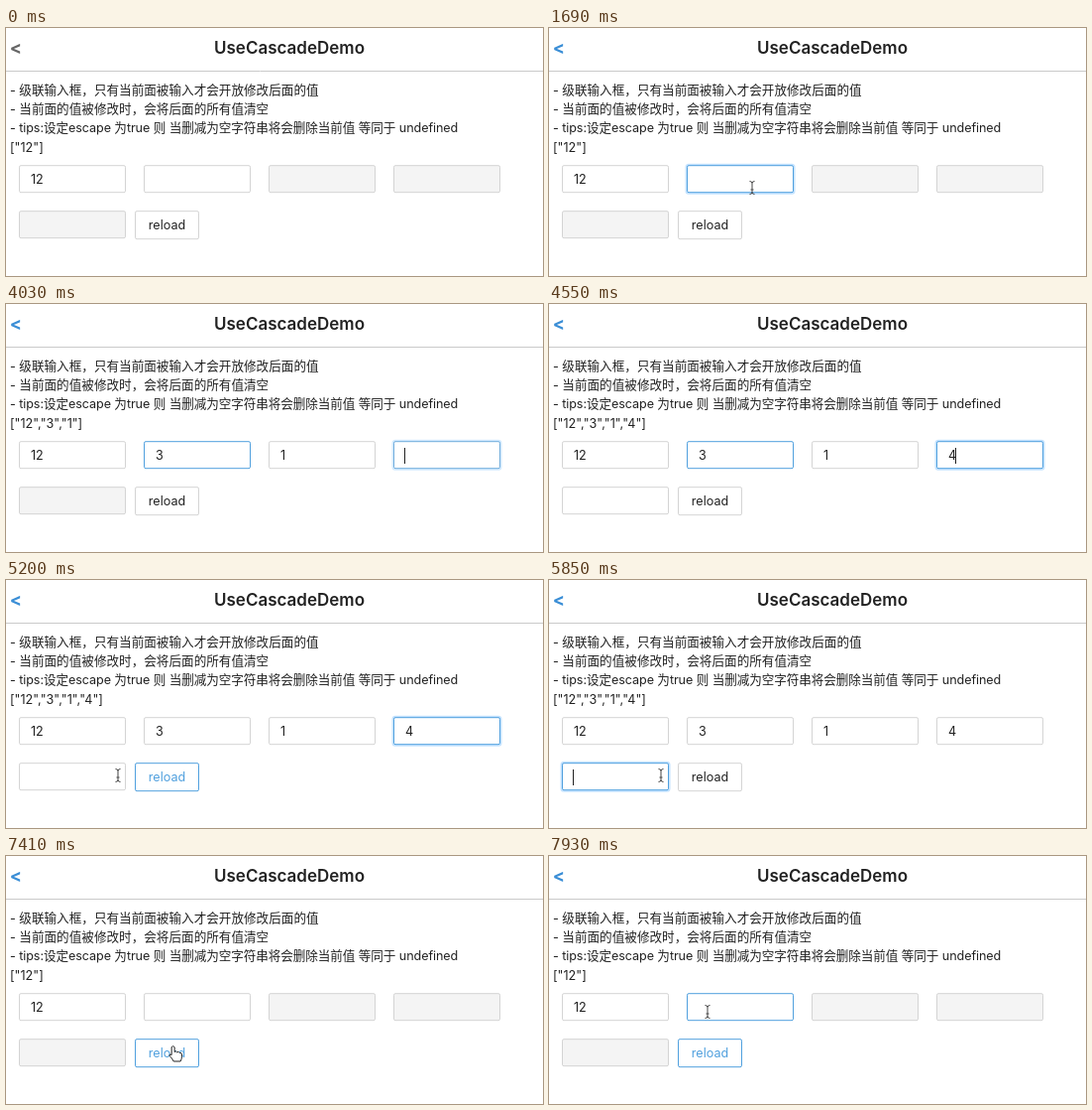
Write an HTML page that moves like this. It is 542 px wide and 250 px high and loops after 8000 ms.

```html
<!DOCTYPE html>
<html lang="zh">
<head>
<meta charset="utf-8">
<style>
  html, body { margin: 0; width: 100%; height: 100%; overflow: hidden; background: #fff; }
  svg { display: block; font: 12.6px Inter, "Noto Sans CJK SC", "Noto Sans CJK", sans-serif; fill: #222; }
  text { white-space: pre; }
</style>
</head>
<body>
<svg id="stage" width="542" height="250" viewBox="0 0 542 250">
  <text id="back" x="3.8" y="26.2" font-size="18" font-weight="700">&lt;</text>
  <text x="286" y="26" font-size="17" font-weight="600" text-anchor="middle">UseCascadeDemo</text>
  <path d="M0 43.5H542" stroke="#cacaca"/>
  <text x="4" y="67">- 级联输入框，只有当前面被输入才会开放修改后面的值</text>
  <text x="4" y="86">- 当前面的值被修改时，会将后面的所有值清空</text>
  <text x="4" y="105" letter-spacing="-.08">- tips:设定escape 为true 则 当删减为空字符串将会删除当前值 等同于 undefined</text>
  <text id="list" x="4" y="124.5"></text>
</svg>
<script>
const LOOP = 8000, STEP = 130, FADE = 260, BLINK = 520, WAKE = 780, RELOAD = 7150;
const GRAY = [212, 212, 212], BLUE = [80, 160, 222], INK = [34, 34, 34];
const stage = document.getElementById('stage');
const list = document.getElementById('list');
const back = document.getElementById('back');

function set(el, attrs) {
  for (const k in attrs) el.setAttribute(k, attrs[k]);
}
function add(tag, attrs) {
  const el = document.createElementNS('http://www.w3.org/2000/svg', tag);
  set(el, attrs);
  return stage.appendChild(el);
}
const mix = (a, b, k) => `rgb(${a.map((v, i) => Math.round(v + (b[i] - v) * k))})`;
const clamp = x => Math.min(1, Math.max(0, x));

// A bordered control; focus is the time it takes the keyboard focus
function control(x, y, w, h, focus) {
  const frame = { x: x + .5, y: y + .7, width: w - 1, height: h - 1, rx: 1.5 };
  return {
    x, y, w, h, focus,
    halo: add('rect', { ...frame, fill: 'none', stroke: '#1890ff', 'stroke-opacity': .25, 'stroke-width': 4 }),
    box: add('rect', { ...frame, fill: '#fff' }),
    text: add('text', { x: x + 12, y: y + 19.4 }),
    has: (px, py) => px > x && px < x + w && py > y && py < y + h
  };
}

// Typed text, time of focus, time of the keystroke
const fields = [['12', -1, 0], ['3', 1170, 2340], ['1', 2730, 3120], ['4', 3900, 4290], ['1', 5460, 6110]]
  .map(([value, focus, typed], i) => ({
    ...control(13 + i % 4 * 126, i < 4 ? 138 : 184, 108, 28, focus), value, typed
  }));
const button = control(130, 184, 65, 29, RELOAD);
set(button.text, { x: 162.5, 'text-anchor': 'middle' });
button.text.textContent = 'reload';
const controls = [...fields, button];

const caret = add('rect', { width: 1, height: 16, fill: '#222' });

// Pointer trips: start, end, destination
const home = [312, 171];
const trips = [
  [780, 1300, 205, 161], [2600, 2730, 205, 161], [4810, 5200, 113, 197],
  [6370, 6760, 171.5, 203], [7280, 7800, 160, 157]
];
const cursors = {
  arrow: { d: 'M0 0V14L3.3 11L5.7 16.6L7.8 15.7L5.5 10.3H10Z', fill: '#111', stroke: '#fff' },
  beam: { d: 'M-2.5-6.5Q0-6.5 0-4.5V4.5Q0 6.5 2.5 6.5M2.5-6.5Q0-6.5 0-4.5M0 4.5Q0 6.5-2.5 6.5M-1.5 2H1.5', fill: 'none', stroke: '#444' },
  hand: { d: 'M-1.5 9V1.2Q0-1 1.5 1.2V6Q3 4.6 4 6.4Q5.6 5 6.6 7Q8.6 6.3 8.8 8.5V11Q8.8 13 7.5 15.5H.5Q-.8 12.5-3.6 9.8Q-3.8 7.6-1.5 9Z', fill: '#fff', stroke: '#222' }
};
const cursor = add('path', { 'stroke-linejoin': 'round' });

const pointAt = t => trips.reduce(([x, y], [from, to, tx, ty]) => {
  const k = clamp((t - from) / (to - from));
  return [x + (tx - x) * k, y + (ty - y) * k];
}, home);

function draw(t) {
  const filled = f => !f.typed || t >= f.typed && t < RELOAD;
  const focused = controls.findLast(c => t >= c.focus);
  const hoverPoint = pointAt(t - STEP);
  const focusLevel = 1 - (1 - clamp((t - focused.focus) / FADE)) ** 2;

  list.textContent = JSON.stringify(fields.filter(filled).map(f => f.value));
  back.setAttribute('fill', t < WAKE ? '#666' : '#3a8ed6');

  controls.forEach((c, i) => {
    const active = c === focused && c.focus > 0;
    const lit = c.has(...hoverPoint) ? 1 : active ? focusLevel : 0;
    c.box.setAttribute('stroke', mix(GRAY, BLUE, lit));
    c.halo.setAttribute('opacity', active && c !== button ? focusLevel : 0);
    if (c === button) return c.text.setAttribute('fill', mix(INK, BLUE, lit));
    c.box.setAttribute('fill', !i || filled(fields[i - 1]) ? '#fff' : '#f4f4f4');
    c.text.textContent = filled(c) ? c.value : '';
  });

  // The blink restarts at each focus and keystroke
  const typing = focused.focus > 0 && focused !== button;
  const since = t - (filled(focused) ? focused.typed : focused.focus);
  set(caret, {
    x: focused.x + (filled(focused) ? 19 : 11), y: focused.y + 7,
    opacity: typing && since % (2 * BLINK) < BLINK ? 1 : 0
  });

  // Typing hides the pointer until it moves again
  const moved = trips.findLast(([from]) => t >= from);
  const key = fields.findLast(f => t >= f.typed).typed;
  const [x, y] = pointAt(t);
  const shape = button.has(x, y) ? 'hand' : fields.some(f => f.has(x, y)) ? 'beam' : 'arrow';
  set(cursor, {
    ...cursors[shape], transform: `translate(${x} ${y})`,
    opacity: moved && moved[0] > key ? 1 : 0
  });
}

const start = performance.now();
function tick() {
  const t = (performance.now() - start) % LOOP;
  draw(Math.floor(t / STEP) * STEP);
  requestAnimationFrame(tick);
}
tick();
</script>
</body>
</html>
```
